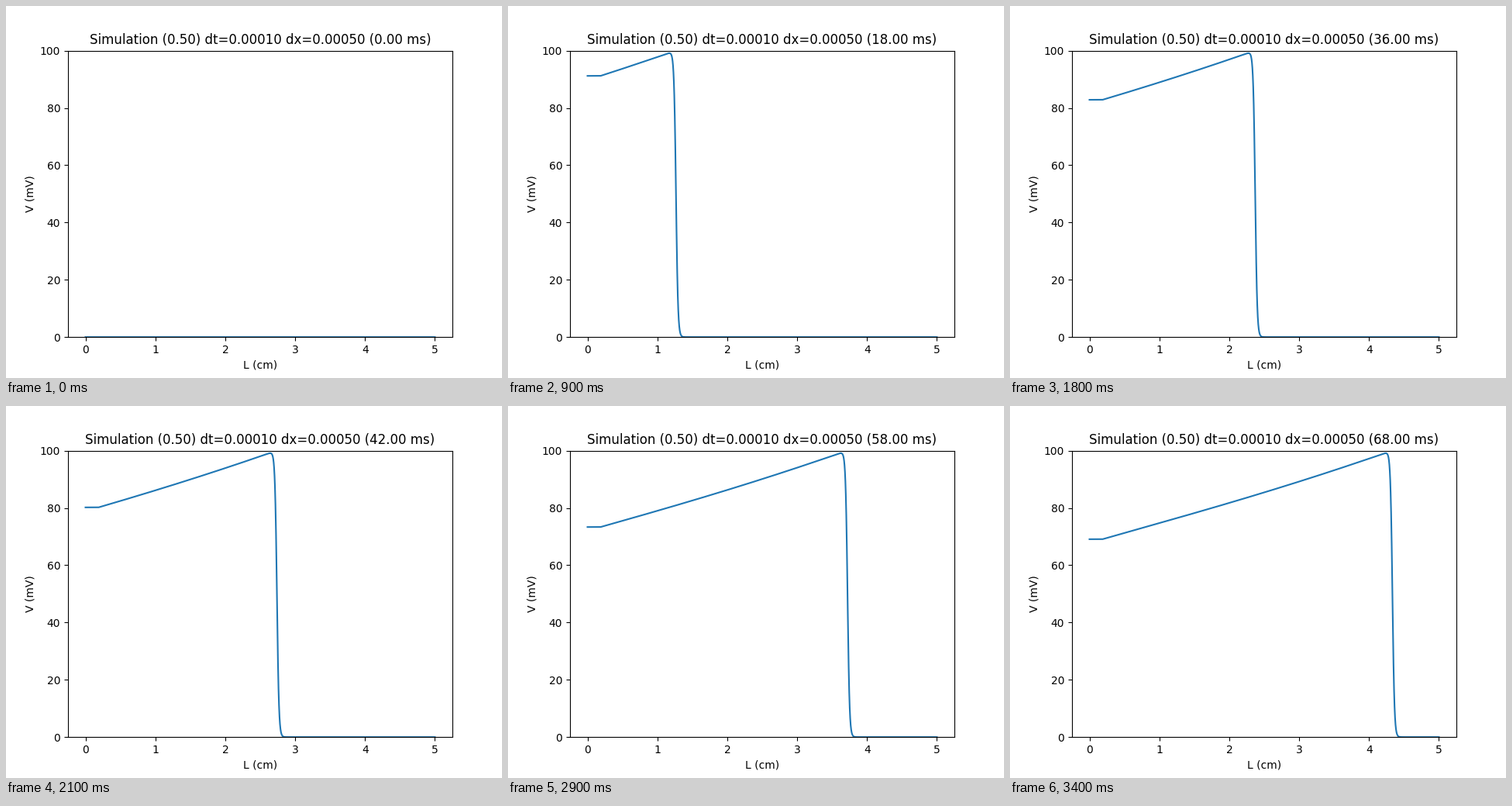
These frames come from a looping animation (640x480 px, 3.5 s). A matplotlib script:

```python
import numpy as np
import matplotlib.pyplot as plt
from matplotlib.animation import FuncAnimation

# Excitable cable (Rogers-McCulloch kinetics) as a travelling wave
FRAMES, INTERVAL = 35, 100
MS_PER_FRAME = 2.0
LENGTH, V_PEAK = 5.0, 100.0
GAIN, THRESHOLD = 1.5, 0.13
ETA1, ETA2 = 4.4, 0.012
SPEED, START = 0.06136, 0.162      # cm/ms, cm
STIM_DELAY, LAG = 0.4, 0.1         # ms

RATE = GAIN / THRESHOLD
RISE = 2 / (RATE * (1 - 2 * THRESHOLD))


def plateau(n):
    """Excited equilibrium for recovery level n."""
    root = np.sqrt((1 - THRESHOLD) ** 2 - 4 * ETA1 * n / RATE)
    return (1 + THRESHOLD + root) / 2


def recovery_curve(t_end, dt=0.02):
    ages = np.arange(0, t_end, dt)
    levels = np.empty_like(ages)
    n = 0.0
    for i in range(len(ages)):
        levels[i] = plateau(n)
        n += dt * ETA2 * (levels[i] - n)
    return ages, levels


x = np.linspace(0, LENGTH, 5001)
arrival = np.maximum(STIM_DELAY, (x - START) / SPEED)
ages, levels = recovery_curve(FRAMES * MS_PER_FRAME)


def voltage(t):
    if t == 0:
        return np.zeros_like(x)
    age = t - arrival
    front = 0.5 * (1 + np.tanh(age / (2 * RISE)))
    return V_PEAK * front * np.interp(age - LAG, ages, levels)


fig, ax = plt.subplots(figsize=(6.4, 4.8), dpi=100)
line, = ax.plot(x, voltage(0), color="#1f77b4", lw=1.5)
ax.set_xlim(-0.25, 5.25)
ax.set_ylim(0, 100)
ax.set_xlabel("L (cm)")
ax.set_ylabel("V (mV)")
title = ax.set_title("")


def update(frame):
    t = frame * MS_PER_FRAME
    line.set_ydata(voltage(t))
    title.set_text(f"Simulation (0.50) dt=0.00010 dx=0.00050 ({t:.2f} ms)")
    return line, title


anim = FuncAnimation(fig, update, frames=FRAMES, interval=INTERVAL,
                     repeat=True, repeat_delay=0, blit=False)
plt.show()
```
